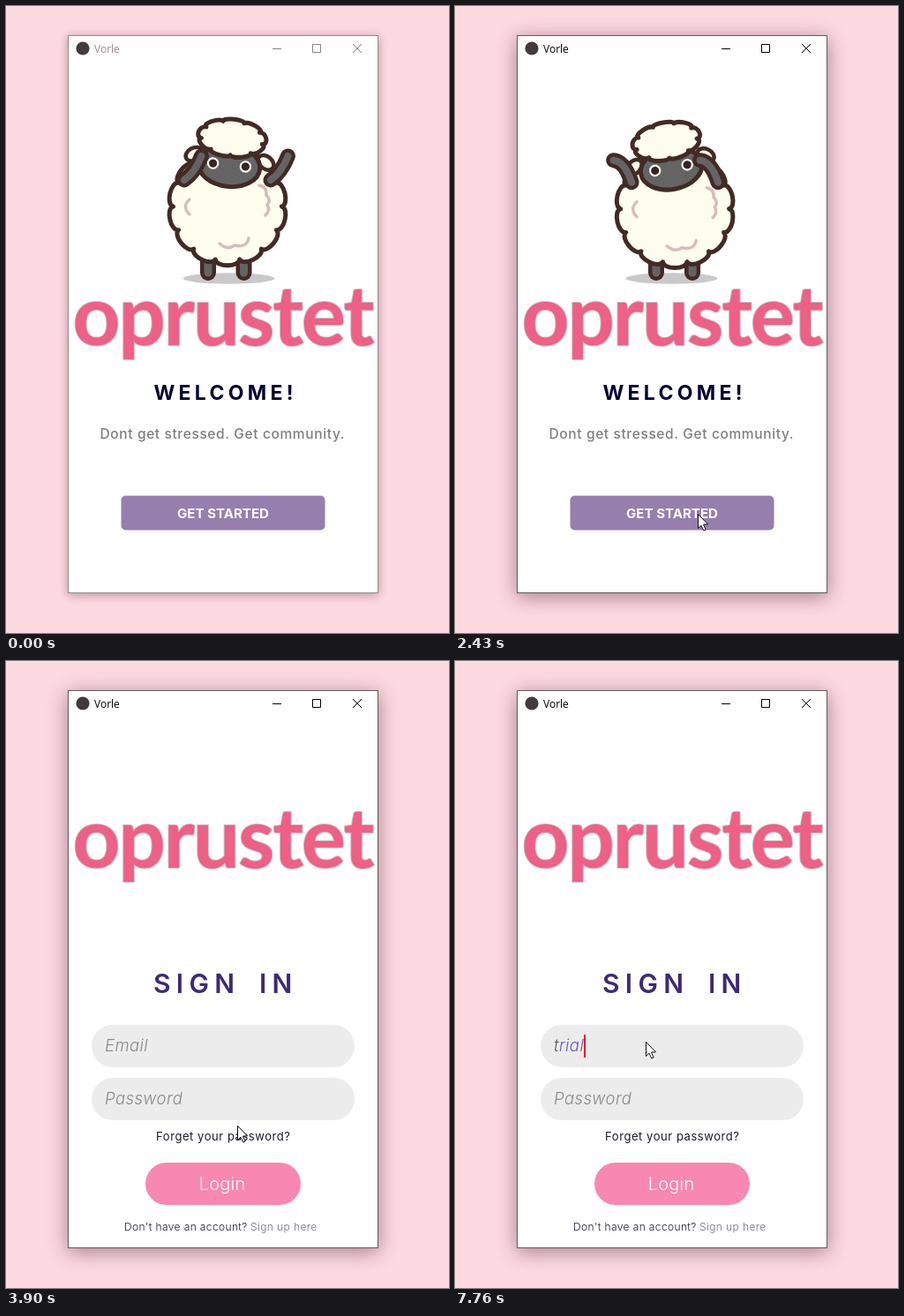
An HTML page with a canvas that plays this animation: 502x710 px, repeating every 8000 ms.

```html
<!DOCTYPE html>
<html lang="en">
<head>
<meta charset="utf-8">
<title>Sign in walkthrough</title>
<style>
html, body { margin: 0; width: 100%; height: 100%; overflow: hidden; background: #fdd9e2; }
canvas { display: block; }
</style>
</head>
<body>
<canvas id="stage" width="502" height="710"></canvas>
<script>
const ctx = document.getElementById('stage').getContext('2d');
const LOOP = 8000, TAU = Math.PI * 2;
const SANS = 'Inter, "Open Sans", sans-serif';
const DARK = '#422a25', GREY = '#646464', CREAM = '#fffdee';
const FOCUS = 1200, SLIDE = 2740, SLIDE_MS = 420, WIDTH = 350;
const HINT = `italic 300 18.5px ${SANS}`;

const clamp = (v, lo, hi) => Math.min(hi, Math.max(lo, v));

// Pointer path: time, x, y
const PATH = [
  [0, 440, 735], [430, 440, 735], [490, 408, 697], [570, 356, 653], [710, 279, 578],
  [840, 275, 575], [2560, 275, 575], [3000, 347, 386], [3420, 347, 386],
  [3780, 281, 564], [4200, 216, 431]
];

// Field content: time, text, caret shown
const TYPING = [
  [0, '', false], [4440, '', true], [4970, '', false], [5300, 'f', true],
  [5780, 'f', false], [6170, '', true], [6640, '', false], [7170, 't', true],
  [7300, 'tr', true], [7430, 'tri', true], [7630, 'tria', true], [7760, 'trial', true]
];

function text(str, x, y, font, color, spacing = 0, align = 'left') {
  ctx.font = font;
  ctx.fillStyle = color;
  ctx.letterSpacing = spacing + 'px';
  ctx.textAlign = align;
  ctx.fillText(str, align === 'center' ? x + spacing / 2 : x, y);
  return ctx.measureText(str).width;
}

function box(x, y, w, h, r, color) {
  ctx.fillStyle = color;
  ctx.beginPath();
  ctx.roundRect(x, y, w, h, r);
  ctx.fill();
}

function oval(x, y, rx, ry, color, line = 0, tilt = 0) {
  ctx.beginPath();
  ctx.ellipse(x, y, rx, ry, tilt, 0, TAU);
  ctx.fillStyle = color;
  ctx.fill();
  if (line) outline(DARK, line);
}

function outline(color, width) {
  ctx.strokeStyle = color;
  ctx.lineWidth = width;
  ctx.stroke();
}

function curve(x0, y0, cx, cy, x1, y1) {
  ctx.moveTo(x0, y0);
  ctx.quadraticCurveTo(cx, cy, x1, y1);
}

// Scalloped fleece: n round bumps on an ellipse, the first one centred on top
function fleece(x, y, rx, ry, n, dip) {
  const at = (k, s) => {
    const a = -TAU / 4 + k * TAU / n;
    return [x + rx * s * Math.cos(a), y + ry * s * Math.sin(a)];
  };
  const peak = (8 - 2 * dip * Math.cos(Math.PI / n)) / (6 * Math.cos(0.86 * Math.PI / n));
  ctx.beginPath();
  ctx.moveTo(...at(-0.5, dip));
  for (let k = 0; k < n; k++) {
    ctx.bezierCurveTo(...at(k - 0.43, peak), ...at(k + 0.43, peak), ...at(k + 0.5, dip));
  }
  ctx.closePath();
  ctx.fillStyle = CREAM;
  ctx.fill();
  outline(DARK, 5);
}

function limb(width, x0, y0, cx, cy, x1, y1) {
  ctx.beginPath();
  curve(x0, y0, cx, cy, x1, y1);
  outline(DARK, width);
  outline(GREY, width - 9);
}

function arm(dx, a) {
  limb(17, 197 + dx, 196, 201 + dx + 10 * a - 2 * a * a, 180 + 8 * a,
    195 + dx + 20 * a + 1.5 * a * a, 164 - a + 6 * a * a);
}

function sheep(t) {
  const phase = (t / 955) % 1;
  const lean = Math.cos(TAU * phase), bend = lean * lean;
  const swing = phase < 0.5
    ? clamp((0.228 - phase) / 0.016, -1, 1)
    : clamp((phase - 0.728) / 0.016, -1, 1);
  ctx.lineCap = ctx.lineJoin = 'round';

  oval(245.5 + 3.5 * (bend + lean), 308.5, 52, 6.2, '#cac8ca');
  for (const x of [228 + 0.5 * (bend + lean), 263.5 + 6 * bend]) limb(18, x, 280, x, 290, x, 302);

  ctx.save();
  ctx.translate(4.2 * bend + 0.75 * lean, 2.5 * bend - 1.5 * lean);
  fleece(246, 226, 66.8, 66.8, 14, 0.92);
  ctx.beginPath();
  curve(203, 218, 194, 226, 203, 235);
  curve(282, 202, 291, 204, 290, 213);
  ctx.quadraticCurveTo(296, 219, 291, 224);
  ctx.quadraticCurveTo(295, 230, 289, 236);
  curve(237, 268, 246, 276, 254, 270);
  ctx.quadraticCurveTo(268, 273, 270, 262);
  outline('#d8bcbb', 3.5);

  ctx.save();
  ctx.translate(246 - 1.2 * bend + 3.25 * lean, 178 + 1.25 * bend - 0.25 * lean);
  ctx.rotate((8.4 * lean - 2.4 * bend) * Math.PI / 180);
  oval(-41, -8, 10, 7, CREAM, 4.5, -0.6);
  oval(41, -7, 10, 7, CREAM, 4.5, 0.6);
  oval(0, 1, 35, 23.5, GREY, 5);
  for (const x of [-18.5, 18.5]) {
    oval(x, 0, 6.7, 6.7, '#fff');
    oval(x, 0, 4.6, 4.6, '#3a2221');
  }
  fleece(0, -30.5, 39, 21.5, 9, 0.9);
  ctx.restore();

  arm(0, swing);
  arm(98, swing);
  ctx.restore();
}

function wordmark(y) {
  ctx.lineJoin = 'round';
  ctx.font = '700 94px Lato, sans-serif';
  ctx.letterSpacing = '-2px';
  ctx.textAlign = 'center';
  ctx.strokeStyle = '#c9bdc0';
  ctx.lineWidth = 2;
  ctx.strokeText('oprustet', 245.5, y);
  ctx.fillStyle = '#ee6085';
  ctx.fillText('oprustet', 245.5, y);
}

function welcome(t) {
  sheep(t);
  wordmark(384);
  text('WELCOME!', 246.5, 445.5, `700 23px ${SANS}`, '#000035', 4.3, 'center');
  text('Dont get stressed. Get community.', 245, 490, `500 15.5px ${SANS}`, '#807c7f', 0.62, 'center');
  box(130.5, 554.5, 231, 39, 5, '#967eae');
  text('GET STARTED', 246, 580, `700 15.1px ${SANS}`, '#fff', 0, 'center');
}

function emailField(t) {
  box(97, 412, 298, 48, 24, '#ececec');
  if (t >= 4440 && t < 4700) oval(216, 432, 15, 15, 'rgba(255,255,255,.4)');
  const [, typed, caret] = TYPING.findLast(step => step[0] <= t);
  let end = 112;
  if (!typed) text('Email', 112, 442, HINT, '#8c878b', 0.4);
  else {
    end += text(typed[0], end, 442, HINT, '#5c5860', 0.4);
    end += text(typed.slice(1), end, 442, HINT, '#6658c0', 0.4);
  }
  if (caret) {
    ctx.fillStyle = '#f00000';
    ctx.fillRect(Math.round(end), 423, 2, 26);
  }
}

function signIn(t) {
  const title = `600 30px ${SANS}`, ink = '#1d1a2c';
  wordmark(234);
  text('SIGN', 167, 375.5, title, '#3d2a75', 6.3);
  text('IN', 287, 375.5, title, '#3d2a75', 6.3);
  emailField(t);
  box(97, 472, 298, 48, 24, '#ececec');
  text('Password', 112, 502, HINT, '#8c878b', 0.4);
  text('Forget your password?', 246, 543, `400 13px ${SANS}`, ink, 0.55, 'center');
  box(158, 568, 176, 48, 24, '#f788b0');
  text('Login', 245, 599, `300 20px ${SANS}`, '#fff', 0.2, 'center');
  text("Don't have an account?", 134, 645, `300 12px ${SANS}`, ink, 0.38);
  text('Sign up here', 277, 645, `300 12px ${SANS}`, '#736b8c', 0.4);
}

function frame(active) {
  ctx.save();
  ctx.shadowColor = active ? 'rgba(70,25,40,.48)' : 'rgba(70,25,40,.38)';
  ctx.shadowBlur = active ? 21 : 10;
  ctx.shadowOffsetY = active ? 4 : 2;
  ctx.fillStyle = active ? '#625a5d' : '#968b8f';
  ctx.fillRect(70, 33, 352, 632);
  ctx.restore();
  ctx.fillStyle = '#fff';
  ctx.fillRect(71, 34, 350, 630);

  const ink = active ? '#000' : '#8a7f80';
  oval(87, 48, 7.6, 7.6, '#44393b');
  text('Vorle', 100, 53, '400 12px "Open Sans", sans-serif', active ? '#000' : '#998b8b');
  ctx.lineCap = 'butt';
  ctx.lineJoin = 'miter';
  ctx.beginPath();
  ctx.moveTo(302, 48.5);
  ctx.lineTo(312, 48.5);
  ctx.rect(347.5, 43.5, 9, 9);
  ctx.moveTo(393, 43);
  ctx.lineTo(403, 53);
  ctx.moveTo(403, 43);
  ctx.lineTo(393, 53);
  outline(ink, 1);
}

function pointer(t) {
  const i = PATH.findLastIndex(p => p[0] <= t);
  const [t0, x0, y0] = PATH[i], [t1, x1, y1] = PATH[i + 1] || [LOOP, x0, y0];
  const p = (t - t0) / (t1 - t0);
  ctx.save();
  ctx.translate(Math.round(x0 + (x1 - x0) * p) + 0.5, Math.round(y0 + (y1 - y0) * p) + 0.5);
  ctx.lineJoin = 'miter';
  ctx.beginPath();
  for (const [x, y] of [[0, 0], [0, 16], [3.5, 12.6], [6.2, 18.5], [8.6, 17.5], [6, 11.6], [11, 11.3]]) ctx.lineTo(x, y);
  ctx.closePath();
  ctx.fillStyle = '#fff';
  ctx.fill();
  outline('#111', 1);
  ctx.restore();
}

function screen(draw, t, shift) {
  if (Math.abs(shift) >= WIDTH) return;
  ctx.save();
  ctx.translate(shift, 0);
  draw(t);
  ctx.restore();
}

function render(t) {
  ctx.fillStyle = '#fdd9e2';
  ctx.fillRect(0, 0, 502, 710);
  frame(t >= FOCUS);

  const p = clamp((t - SLIDE) / SLIDE_MS, 0, 1);
  const moved = Math.round(WIDTH * (1 - (1 - p) ** 2));
  ctx.save();
  ctx.beginPath();
  ctx.rect(71, 62, WIDTH, 602);
  ctx.clip();
  screen(welcome, t, -moved);
  screen(signIn, t, WIDTH - moved);
  ctx.restore();
  pointer(t);
}

const start = performance.now();
function tick() {
  render((performance.now() - start) % LOOP);
  requestAnimationFrame(tick);
}
tick();
</script>
</body>
</html>
```
